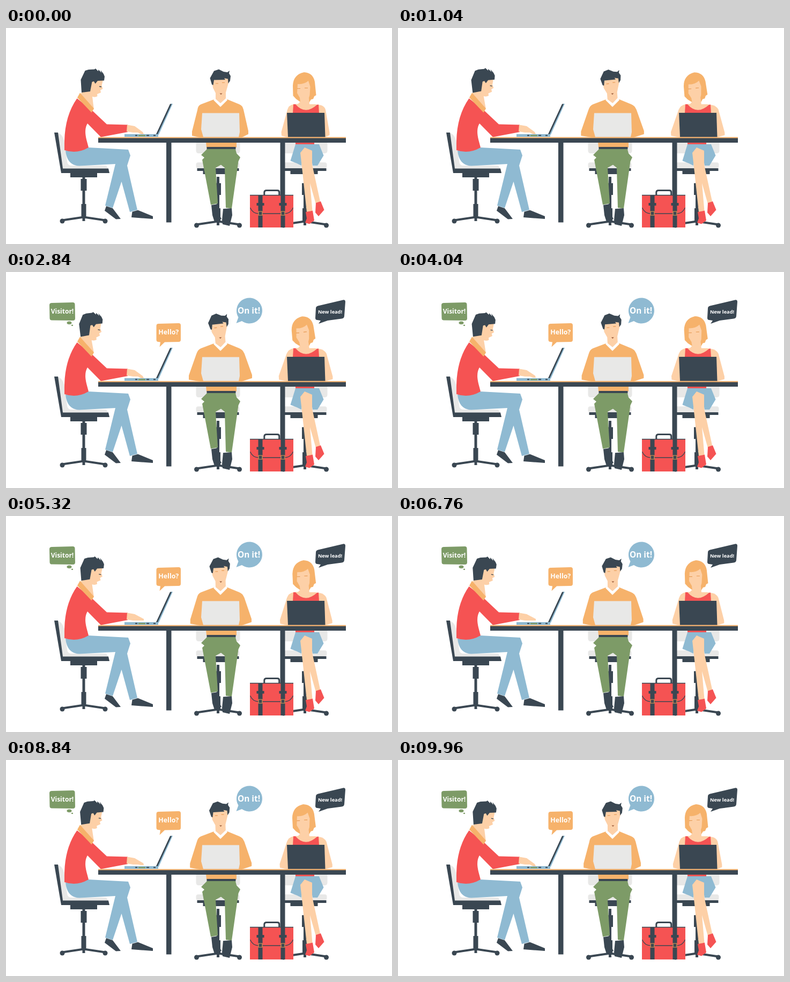
Write an HTML page that moves like this. It is 720 px wide and 405 px high and loops after 10000 ms.

```html
<!DOCTYPE html>
<html lang="en">
<head>
<meta charset="utf-8">
<title>Team at a desk</title>
<style>
  html, body { margin: 0; width: 100%; height: 100%; overflow: hidden; background: #fff; }
  svg { display: block; width: 100vw; height: 100vh; }
  .dark { fill: #3a4752; } .red { fill: #f55353; } .orange { fill: #f6b26b; }
  .skin { fill: #fdd0a7; } .blue { fill: #8fbad2; } .green { fill: #7d9b67; } .gray { fill: #e8e8e7; }
  .line { fill: none; stroke: #3a4752; stroke-width: 4; }
  .handle { stroke-width: 3; } .thin { stroke-width: 1.3; }
  .face { fill: none; stroke: #e79b55; stroke-width: 1.2; }
  text { fill: #fff; font-family: "Open Sans", sans-serif; font-weight: 700; text-anchor: middle; }
</style>
</head>
<body>
<svg viewBox="0 0 720 405">
  <defs>
    <g id="base">
      <path class="line" d="M-40 5.500 L0 -.5 L40 5.500"/>
      <path class="dark" d="M-2.500 -84h5V7h-5z M-5.500 -72h11v22h-11z M-4.500 -25h9V0h-9z"/>
      <circle class="dark" cx="-40" cy="7" r="4.500"/><circle class="dark" cx="40" cy="7" r="4.500"/>
    </g>
    <g id="seat">
      <path class="gray" d="M-41 215h82v15q0 5-5 5h-72q-5 0-5-5z"/>
      <rect class="gray" x="-41" y="252" width="81" height="11" rx="4"/>
      <path class="dark" d="M-39 263h78v5h-78z M-28 268h51v6h-51z"/>
    </g>
  </defs>

  <use href="#base" x="145" y="355"/>
  <path class="gray" d="M97 197Q107 200 109 216L114 250Q115 258 122 258L187 258L191 264L105 264z"/>
  <path class="dark" d="M90 196H97L106 263.500H191L193 272H103z M120 272h50v8h-50z"/>
  <path class="blue" d="M111 230Q114 258 137 258.500L204 255L185 333L199 337.500L215.500 288L231 345L245 341L226 258L232 239L228 228L153 224z"/>
  <path class="dark" d="M187 334L199 338L214 358L205 358.500L184 342.500z M235.500 344.500L246 341.500L274 353V358L234 355z"/>

  <g id="headA">
    <path class="skin" d="M157 98L181 97L178.500 108L180.500 114L176 116.500L177 121L170 124L170.500 128Q166 130.500 161 128.500L164 153L139 124z"/>
    <path class="dark" d="M139.500 97L147.500 80L154 78L165 77.500L167 76L172 81L172.500 78L178 84L176.500 79L182 86L184 91L183 98.500L171 99L166.500 104.500L164 100L160.500 101L157 119L141 121z"/>
    <path class="line thin" d="M174 109.500L178 110.500"/>
  </g>
  <path class="red" d="M132.500 132Q110 164 109 212V229Q132 237 154 224L150.500 211Q145 190 152 179L177 204.500L227 195V181.500L188 180.500L160 154z"/>
  <path class="orange" d="M138 121.500L164 151L159.500 158.500L133 130.500z"/>
  <path id="hand" class="skin"/>
  <path class="blue" d="M307 142H311L285 200H280z M221 199h63v5h-63z"/>
  <path class="dark" d="M306 142.500H309L283 199H280z M241 200.500h4v2h-4z M262 200.500h5v2h-5z M275 200.500h4v2h-4z"/>
  <path class="green" d="M247 200.500h13v2.500h-13z"/>

  <use href="#seat" x="395.500"/>
  <use href="#base" x="395.500" y="363"/>
  <path class="orange" d="M373 214h57v10h-56z"/>
  <path class="dark" d="M374.500 223h54v4.500h-54z"/>
  <path class="green" d="M375 227H428L430 235L437 242.500L433.500 250L421 338.500L410 337L408 262L401 256.500L391 262L395 329L382 331.500L366 247L370 243L364 238z"/>
  <path class="dark" d="M383 332L395 330L399 352L402 358L389 363.500L385 351z M405 339L421 338L422 351L417 371L404 368L403 360z"/>

  <use href="#seat" x="558.500"/>
  <use href="#base" x="557.500" y="363"/>
  <path class="red" d="M540 213h35v6h-35z"/>
  <path class="blue" d="M540 218H584L592.500 239L581 258H572L567 231L553 233L551 258L543 254L530.500 249z"/>
  <path class="skin" d="M549 234L557 224L571 230V256L586 325L578 330L567 291L571.500 343L561 345L553 270z"/>
  <path class="red" d="M578 328L587 325L593.500 341L583 353L577 346z M559 345L572 342.500L575 361L566 367.500L558 365L561 357z"/>

  <path class="dark" d="M299 214h9.500V364.500h-9.500z M511.500 214h9V364.500h-9z"/>

  <path id="bodyB" class="orange"/>
  <path fill="#fff" d="M387 135L390 132L400 140L410 132L413 135L400 148z"/>
  <g id="headB">
    <path class="skin" d="M384 100L386 112L391 122V133L400 141L410 132V121L414.500 105L417 96L400 92z"/>
    <path class="dark" d="M380.500 94L388 80.500L397 77.500L406 82L413 83L417 80L416 85L419 90L418 99L414.500 104L414 95.500L407 94L409 97L388 97.500L386.500 107L384 106z"/>
    <path class="face" d="M391 104h5M403 102.500h5"/>
    <path d="M398.500 122.500h5l-2.500 2.500z" fill="#9a5b3a"/>
  </g>
  <path class="gray" d="M366 159.500H435L436 195L434 204.500H368L364 190z"/>

  <path id="bodyC" class="skin"/>
  <path class="red" d="M536 143L540 143Q558 164 580 144L583 143.500L584 160H535z"/>
  <g id="headC">
    <path class="orange" d="M535 108Q536 87 556 83Q573 84 576 101L578.500 126L575 128L573 133L569 134L564 142L548 138L541 133L535.500 127z"/>
    <path class="skin" d="M544 105Q556 106 564 99L567.500 110L566.500 126L565 131L566 143Q558 152 544 143L549 138L548 131L543 122z"/>
    <path class="face" d="M543 113.500h6M557 112.500h6"/>
  </g>
  <path class="dark" d="M524 159H594L595.500 204.500H526z"/>

  <path class="orange" d="M172 204.500h462v3H172z"/>
  <path class="dark" d="M172 206.500h462v8.500H172z"/>

  <path class="red" d="M455 313h81v61h-81z"/>
  <path class="line handle" d="M481.800 314V308Q482 304.500 486 304.500H506Q509.500 304.500 509.700 308V314"/>
  <path class="line thin" d="M455 313.500H536M455.500 337Q460 348 472 348H519Q531 348 535.500 337"/>
  <path class="dark" d="M470.500 313h8v61h-8z M512.500 313h8v61h-8z M467.500 328h14v5h-14z M509.500 328h14v5h-14z"/>
  <path class="face" d="M471 344h7v7h-7z M513 344h7v7h-7z"/>

  <g class="bubble">
    <path class="green" d="M85.500 58L124.500 57Q128.500 57 128.500 61L129 87Q129 91 125 91L85.500 90.500Q81.500 90.500 81.500 86.500L81 62Q81 58 85.500 58z"/>
    <ellipse class="green" cx="118" cy="95.300" rx="4.500" ry="2.900"/><ellipse class="green" cx="123.500" cy="100" rx="1.700" ry="1.200"/>
    <text font-size="12" x="105" y="78">Visitor!</text>
  </g>
  <g class="bubble">
    <path class="orange" d="M284.500 97L322 96Q326 96 326 100V127Q326 131 322 131L296 131.500L286.500 140.500L288 131.500L284.500 131Q280.500 131 280.500 127V101Q280.500 97 284.500 97z"/>
    <text font-size="12.400" x="303.300" y="117.200">Hello?</text>
  </g>
  <g class="bubble">
    <path class="blue" d="M429.500 96L433.500 85A24 24 0 1 1 440 92z"/>
    <text font-size="15.400" x="453" y="77.800">On it!</text>
  </g>
  <g class="bubble">
    <path class="dark" d="M582 63.500L628.500 52.500Q633 51.500 633 56L631 83Q630.500 87 626 87.500L600 91L583 97L587 91L580.500 90Q577 90 577 86L578 68Q578 64.500 582 63.500z"/>
    <text font-size="9.200" x="604.500" y="78">New lead!</text>
  </g>
</svg>
<script>
const LOOP = 10000, SWAY = 1640;
const el = id => document.getElementById(id);

// Smooth interpolation through [time, value] pairs.
function ease(keys, t) {
  const i = Math.max(1, keys.findIndex(k => k[0] >= t));
  const [t0, a] = keys[i - 1], [t1, b] = keys[i];
  const u = (t - t0) / (t1 - t0);
  return a + (b - a) * u * u * (3 - 2 * u);
}

const leftArm = [[0, 0], [120, .8], [160, 1.2], [200, 2.2], [400, 3.2], [1220, 6], [SWAY, 0]];
const rightArm = [[0, 0], [120, 1], [160, 3], [200, 5.6], [400, 6], [1220, 7], [SWAY, 0]];
const headTilt = [[0, 0], [200, .2], [400, 1], [1220, 3.4], [SWAY, 0]];
const handLift = [[0, 0], [160, 0], [200, 1], [400, 1], [1000, 0], [SWAY, 0]];

const pivots = [[120, 98], [287, 140], [430, 96], [583, 97]];
const bubbles = [...document.querySelectorAll('.bubble')].map((node, i) => ({
  node, text: node.querySelector('text'), pivot: pivots[i], start: 1060 + 220 * i
}));

const pose = (x, y, scale, angle = 0) =>
  `translate(${x} ${y}) rotate(${angle}) scale(${scale}) translate(${-x} ${-y})`;

function spring(age) {
  const a = age * .0122;
  return age <= 0 ? 0 : 1 - Math.exp(-.51 * a) * Math.cos(a);
}

function drawBubble({ node, text, pivot, start }, t) {
  const age = t - start, s = spring(age);
  node.setAttribute('transform', pose(...pivot, s, 30 * (s - 1)));
  const u = Math.min(1, Math.max(0, (age - 340) / 400));
  text.setAttribute('transform', pose(+text.getAttribute('x'), text.getAttribute('y') - 4, 1 - (1 - u) ** 3));
}

function draw(t) {
  const p = t % SWAY;
  const l = ease(leftArm, p), r = ease(rightArm, p), tilt = ease(headTilt, p), lift = ease(handLift, p);

  el('headA').setAttribute('transform', `rotate(${-tilt} 148 152)`);
  el('headB').setAttribute('transform', `rotate(${-tilt * 1.4} 400 137)`);
  el('headC').setAttribute('transform', `rotate(${-tilt} 557 147)`);
  el('hand').setAttribute('d', `M226 181.500L240 184L${255 + 2 * lift} ${195 - 2 * lift}L257 ${199 - 3 * lift}` +
    `L252 ${199 - 3 * lift}L246 196L237 196L225 194z`);
  el('bodyB').setAttribute('d', `M389 133.500L364 143Q358 145 ${357 - l / 3} 154L${347 - l} 194V202L361 205H440` +
    `L${452 + r} 199V193L${443 + r / 4} 153Q441 145 435 143L412 133.500L400 146z`);
  el('bodyC').setAttribute('d', `M541 142.500L536 143Q527 145 ${525 - l / 4} 153L${513.5 - l * .8} 195L${514 - l * .8} 202L526 205H594` +
    `L${603.5 + r * .85} 201V196L${596 + r / 4} 153Q594 146 586 144.500L577 143z`);
  bubbles.forEach(b => drawBubble(b, t));
}

function tick() {
  draw(performance.now() % LOOP);
  requestAnimationFrame(tick);
}
tick();
</script>
</body>
</html>
```
